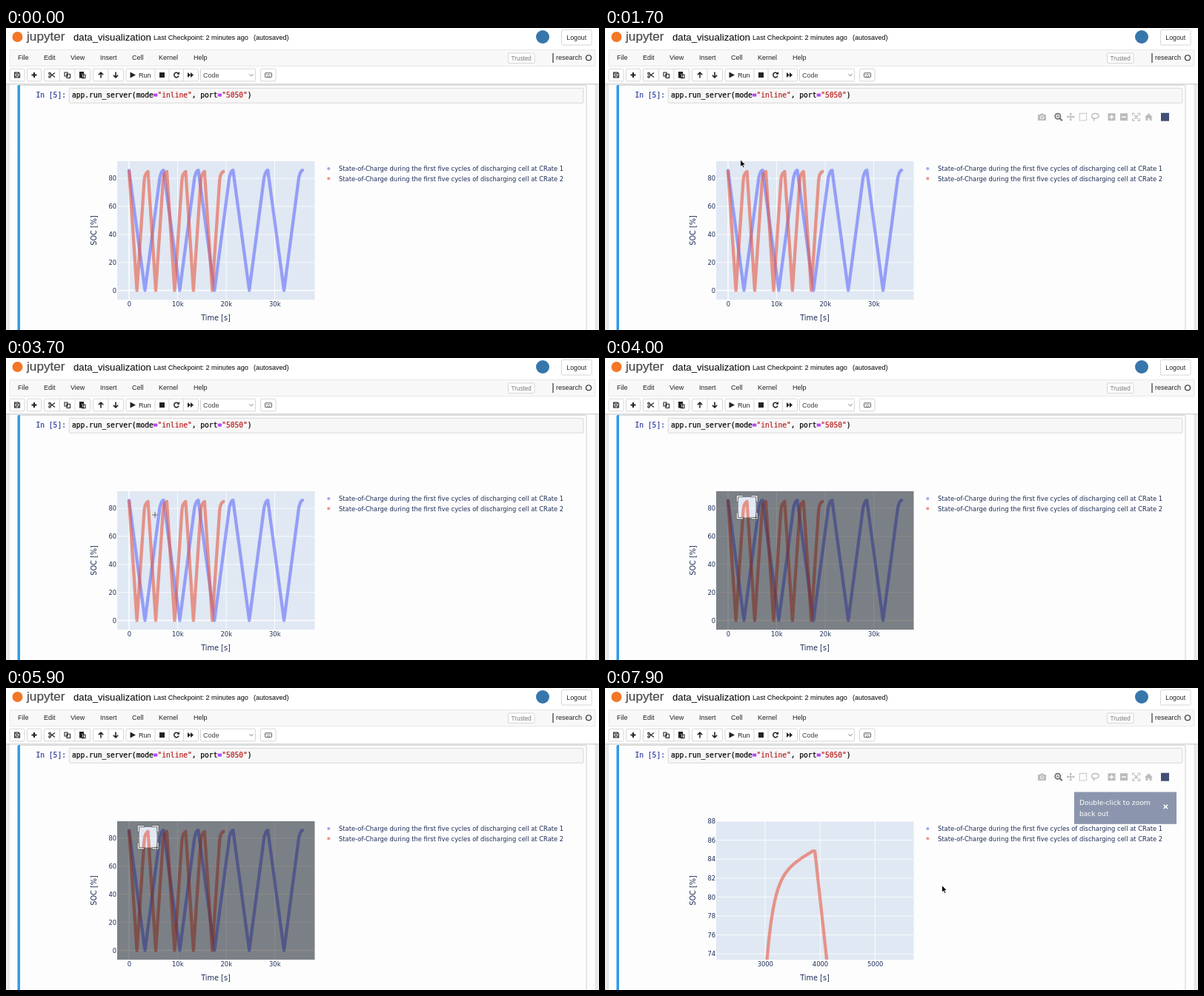
Write an HTML page that moves like this. It is 800 px wide and 408 px high and loops after 8000 ms.

```html
<!DOCTYPE html>
<html lang="en">
<head>
<meta charset="utf-8">
<title>Notebook zoom</title>
<style>
  html, body { margin: 0; width: 100%; height: 100%; overflow: hidden; background: #fff; }
  svg { display: block; width: 800px; height: 408px; }
  text { white-space: pre; }
  .ui { font: 9.02px "Liberation Sans", Arial, sans-serif; fill: #222; }
  .code { font: 9.61px "DejaVu Sans Mono", monospace; stroke-width: .22; }
  .plot { font: 8.37px "DejaVu Sans", Verdana, sans-serif; fill: #1c2c56; }
  .btn { fill: #fff; stroke: #ccc; stroke-width: .8; }
  .icon { fill: none; stroke: #222; stroke-width: 1.1; }
  .solid { fill: #222; }
  .bar { fill: none; stroke: #bcbcbc; stroke-width: 1.3; }
  .bar .fill { fill: #bcbcbc; stroke: none; }
</style>
</head>
<body>
<svg id="stage" viewBox="0 0 800 408">
  <defs>
    <clipPath id="box"><rect x="150" y="180" width="266.5" height="187"/></clipPath>
    <linearGradient id="shade" x2="0" y2="1">
      <stop stop-color="#ccc"/><stop offset="1" stop-color="#ccc" stop-opacity="0"/>
    </linearGradient>
    <linearGradient id="edge">
      <stop stop-color="#f0f0f0"/><stop offset="1" stop-color="#e2e2e2"/>
    </linearGradient>
  </defs>
</svg>
<script>
const NS = 'http://www.w3.org/2000/svg';
const stage = document.getElementById('stage');

function add(parent, tag, attrs = {}, content) {
  const el = document.createElementNS(NS, tag);
  for (const key in attrs) el.setAttribute(key, attrs[key]);
  if (content !== undefined) el.textContent = content;
  return parent.appendChild(el);
}
const group = (parent, attrs) => add(parent, 'g', attrs);
const rect = (p, x, y, width, height, attrs) => add(p, 'rect', { x, y, width, height, ...attrs });
const path = (p, d, attrs) => add(p, 'path', { d, ...attrs });
const dot = (p, cx, cy, r, attrs) => add(p, 'circle', { cx, cy, r, ...attrs });
const label = (p, x, y, str, cls, style = '', anchor = 'start') =>
  add(p, 'text', { x, y, class: cls, style, 'text-anchor': anchor }, str);

// ---- Notebook page ----
rect(stage, 0, 75, 5, 333, { fill: 'url(#edge)' });
rect(stage, 0, 75, 5.5, 333, { fill: 'url(#edge)', transform: 'translate(800) scale(-1 1)' });
rect(stage, 5, 77, 789.5, 331, { fill: '#fdfdfd' });
rect(stage, 0, 75, 800, 2.5, { fill: 'url(#shade)' });
path(stage, 'M19 77.3H781.5Q783 77.3 783 79V408', { fill: 'none', stroke: '#c4c4c4', 'stroke-width': .8 });
path(stage, 'M15.5 408V78.5Q15.5 77 17 77H19V408Z', { fill: '#2f9be8' });

dot(stage, 15.5, 12, 7, { fill: '#f37726' });
label(stage, 28, 17.2, 'jupyter', 'ui', 'font-size:17.2px;fill:#4e4e4e;stroke:#4e4e4e;stroke-width:.25');
label(stage, 91, 16.7, 'data_visualization', 'ui', 'font-size:13.2px;fill:#000');
label(stage, 199, 16.3, 'Last Checkpoint: 2 minutes ago', 'ui', 'font-size:9.15px;fill:#000');
label(stage, 334, 16.3, '(autosaved)', 'ui', 'fill:#000');
dot(stage, 724, 12, 9, { fill: '#3776ab' });
rect(stage, 749.5, 2.5, 40.5, 20.5, { class: 'btn', rx: 1.5 });
label(stage, 769.7, 15.8, 'Logout', 'ui', 'font-size:8.8px', 'middle');

rect(stage, 5, 29.5, 790, 22, { fill: '#f8f8f8', stroke: '#e4e4e4', 'stroke-width': .8, rx: 1 });
[['File', 16], ['Edit', 51], ['View', 87], ['Insert', 127], ['Cell', 170], ['Kernel', 206], ['Help', 253]]
  .forEach(([name, x]) => label(stage, x, 43.2, name, 'ui'));
rect(stage, 677.5, 34, 35.5, 13.5, { class: 'btn', rx: 1.5 });
label(stage, 695.2, 43.6, 'Trusted', 'ui', 'font-size:8.2px;fill:#777', 'middle');
path(stage, 'M738 34V47', { class: 'icon' });
label(stage, 742, 43.2, 'research', 'ui');
dot(stage, 786, 40.3, 3.5, { class: 'icon' });

// ---- Toolbar ----
[[5, 20], [28.5, 19], [51.5, 62], [117.5, 41], [162, 97.5], [343.5, 20.5]]
  .forEach(([x, w]) => rect(stage, x, 55.2, w, 16.6, { class: 'btn', rx: 1.5 }));
path(stage, 'M72.5 55.5V71.5M93 55.5V71.5M138 55.5V71.5M201 55.5V71.5M220 55.5V71.5M239.5 55.5V71.5', { class: 'btn' });
rect(stage, 262.5, 55.2, 74, 16.6, { class: 'btn', rx: 1 });
label(stage, 266, 67, 'Code', 'ui', 'fill:#444');
label(stage, 179, 66.7, 'Run', 'ui');
path(stage, 'M328.5 62.3L331 64.8L333.5 62.3', { class: 'icon', style: 'stroke:#666;stroke-width:.9' });
path(stage, 'M11.5 60H17L18.5 61.5V67H11.5ZM13.3 60V62.5H16.3V60M13.2 67V64.5H16.8V67', { class: 'icon' });
path(stage, 'M38 60V67M34.5 63.5H41.5', { class: 'icon', style: 'stroke-width:2' });
path(stage, 'M60 62L66 66.5M60 65L66 60.5', { class: 'icon' });
dot(stage, 59, 61.3, 1.3, { class: 'icon' });
dot(stage, 59, 65.8, 1.3, { class: 'icon' });
path(stage, 'M79 60H83V65H79ZM82 62.3H86.5V67.5H82Z', { class: 'icon' });
path(stage, 'M99.5 59.5H104.5V67H99.5ZM102.5 63H107V67.8H102.5Z', { class: 'icon' });
path(stage, 'M99 59H105V62H102V67H99Z', { class: 'solid' });
path(stage, 'M128 67.5V60.5M124.8 63.3L128 60.1L131.2 63.3M148 59.5V66.5M144.8 63.7L148 66.9L151.2 63.7', { class: 'icon', style: 'stroke-width:1.6' });
path(stage, 'M167.5 59.5L175 63.5L167.5 67.5Z', { class: 'solid' });
rect(stage, 207, 60, 7, 7, { class: 'solid' });
path(stage, 'M232.5 61.5A3.2 3.2 0 1 0 233 64.5', { class: 'icon', style: 'stroke-width:1.5' });
path(stage, 'M230.3 62.7H234V59Z', { class: 'solid' });
path(stage, 'M245 60L249 63.5V60L253 63.5L249 67V63.5L245 67Z', { class: 'solid' });
rect(stage, 349.5, 60.7, 9, 5.8, { class: 'icon', style: 'stroke:#555;stroke-width:.9', rx: .6 });
path(stage, 'M350.8 62.7H357.5M351.8 65H356.5', { class: 'icon', style: 'stroke:#555;stroke-dasharray:1 .6' });

// ---- Code cell ----
label(stage, 40.5, 94.3, 'In [5]:', 'code', 'fill:#303f9f;stroke:#303f9f');
rect(stage, 85.3, 81.3, 693.5, 20, { fill: '#f7f7f7', stroke: '#cfcfcf', 'stroke-width': .8, rx: 1 });
const code = label(stage, 89, 94.3, '', 'code');
[['app.run_server(mode', '#000'], ['=', '#a2f'], ['"inline"', '#ba2121'], [', port', '#000'],
 ['=', '#a2f'], ['"5050"', '#ba2121'], [')', '#000']].forEach(([str, fill]) =>
  add(code, 'tspan', { fill, stroke: fill, 'font-weight': str === '=' ? 'bold' : 'normal' }, str));

// ---- Charge curves: seconds and percent ----
function cycles(first, period, start, rise) {
  const pts = [[0, start]];
  for (let i = 0; i < 5; i++) {
    const t0 = first + i * period;
    pts.push([t0, 0], ...rise.map(([t, v]) => [t0 + t, v]));
  }
  return pts;
}
const sample = (n, fn) => Array.from({ length: n + 1 }, (_, i) => fn(i / n));
const slow = cycles(3282, 7160, 85.6,
  sample(8, k => [3050 + 770 * k, 85.8 - 5.3 * (1 - k) ** 2]));
const fast = cycles(1620, 3880, 85, [
  ...sample(24, k => {
    const u = 835 * k;
    return [1414 + u, 85 - 8.6 * Math.exp(-u / 130) - 3 * (1 - u / 870)];
  }),
  [2285, 84.85]
]);
const BLUE = '#636efa', RED = '#e85a43';

function chart(X, Y, xTicks, yTicks, xName) {
  const g = group(stage);
  const inner = group(g, { 'clip-path': 'url(#box)' });
  const grid = (d, v) => path(inner, d, { stroke: '#fff', 'stroke-width': v ? .8 : 1.4 });
  xTicks.forEach(v => {
    grid(`M${X(v)} 180V367`, v);
    label(g, X(v) + .3, 376.2, xName(v), 'plot', '', 'middle');
  });
  yTicks.forEach(v => {
    grid(`M150 ${Y(v)}H416.5`, v);
    label(g, 149.2, Y(v) + 3.2, v, 'plot', '', 'end');
  });
  [[slow, BLUE], [fast, RED]].forEach(([pts, stroke]) =>
    add(inner, 'polyline', {
      points: pts.map(([t, v]) => `${X(t).toFixed(2)},${Y(v).toFixed(2)}`).join(' '),
      fill: 'none', stroke, 'stroke-width': 4.3, opacity: .6,
      'stroke-linejoin': 'round', 'stroke-linecap': 'round'
    }));
  return g;
}

rect(stage, 150, 180, 266.5, 187, { fill: '#e0e8f3' });
const full = chart(t => 166 + t * .00655, v => 354.5 - v * 1.8925,
  [0, 10000, 20000, 30000], [0, 20, 40, 60, 80], v => v ? v / 1000 + 'k' : '0');
const zoomed = chart(t => 216 + (t - 3000) * .0742, v => 180 + (88 - v) * 12.8,
  [3000, 4000, 5000], [74, 76, 78, 80, 82, 84, 86, 88], v => v);
label(stage, 283, 394.7, 'Time [s]', 'plot', 'font-size:9.72px', 'middle');
add(stage, 'text', {
  transform: 'translate(122 273.5) rotate(-90)', class: 'plot',
  style: 'font-size:9.72px', 'text-anchor': 'middle'
}, 'SOC [%]');
[[190, BLUE, 1], [203.4, RED, 2]].forEach(([y, fill, n]) => {
  dot(stage, 435.3, y, 2.1, { fill, opacity: .6 });
  label(stage, 449, y + 3.4, 'State-of-Charge during the first five cycles of discharging cell at CRate ' + n, 'plot');
});

// ---- Mode bar ----
const bar = group(stage, { class: 'bar' });
path(bar, 'M584 117H587L588 115.5H591L592 117H595V125H584Z', { class: 'fill' });
dot(bar, 589.5, 120.8, 2.1, { style: 'stroke:#fff;stroke-width:1' });
const lens = group(bar, { style: 'stroke:#737373' });
dot(lens, 610.8, 119.3, 3.6, { 'stroke-width': 1.8 });
path(lens, 'M613.5 122L616.8 125.3', { 'stroke-width': 2.2 });
path(lens, 'M609 119.3H612.6M610.8 117.5V121.1', { 'stroke-width': .9 });
path(bar, 'M623.5 120H633M628.2 115.2V124.8');
path(bar, 'M622.5 120L625 118V122ZM634 120L631.5 118V122ZM628.2 114.3L626.2 116.7H630.2ZM628.2 125.7L626.2 123.3H630.2Z', { class: 'fill' });
rect(bar, 640.2, 115.5, 9.4, 9.4, { 'stroke-dasharray': '1.7 1' });
path(bar, 'M659 123C655 120 656 115.5 661.5 115.5S668 120.5 663 122C660 123 657.5 120.5 659 122.5Q661 124 659.5 125.6');
[683.5, 700].forEach((x, i) => {
  rect(bar, x - 5, 115.2, 10, 10, { class: 'fill' });
  path(bar, `M${x - 3} 120.2h6` + (i ? '' : `M${x} 117.2v6`), { style: 'stroke:#fff;stroke-width:1.5' });
});
path(bar, 'M711.8 118V115.3H714.5M718.7 115.3H721.5V118M721.5 122.3V125H718.7M714.5 125H711.8V122.3M714 117.5L719.3 122.8M719.3 117.5L714 122.8');
path(bar, 'M728 120.5L733.5 115.3L739 120.5H737.5V125H734.7V122H732.3V125H729.5V120.5Z', { class: 'fill' });
rect(bar, 750, 114.7, 11, 11, { style: 'fill:#3f4f75;stroke:none' });

// ---- Hover label ----
const tip = group(stage);
rect(tip, 265, 209, 62, 15, { fill: '#e5ecf6', opacity: .8 });
path(tip, 'M187 216.5L191.2 212.3V209H265V224H191.2V220.7Z', { fill: '#e2502f', stroke: '#444', 'stroke-width': .8 });
label(tip, 194, 219.7, '(3021, 72.82741)', 'ui', 'fill:#444');
label(tip, 266.8, 219.7, 'State-of-Cha...', 'ui', 'fill:#e2502f');

// ---- Zoom selection ----
const select = group(stage);
const dim = path(select, '', { 'fill-rule': 'evenodd', fill: '#000', 'fill-opacity': .45 });
const corners = path(select, '', { fill: '#fff', stroke: '#444', 'stroke-width': .7 });
const START = [179.8, 188];

function drawSelection([r, b]) {
  const [l, t] = START;
  dim.setAttribute('d', `M150 180H416.5V367H150ZM${l} ${t}V${b}H${r}V${t}Z`);
  const c = Math.max(0, Math.min(r - l, b - t, 14) / 2), w = 2.1, e = .35;
  const corner = (x, y, sx, sy) =>
    `M${x - sx * (w + e)} ${y + sy * (c - e)}h${sx * w}v${-sy * c}h${sx * c}v${-sy * w}h${-sx * (c + w)}v${sy * (c + w)}Z`;
  corners.setAttribute('d',
    corner(l, t, 1, 1) + corner(r, t, -1, 1) + corner(r, b, -1, -1) + corner(l, b, 1, -1));
}

// ---- Notice ----
const notice = group(stage);
rect(notice, 633, 140.5, 138, 43.3, { fill: '#8b96ae' });
const noticeStyle = 'font-size:9.12px;fill:#fff';
label(notice, 640, 158, 'Double-click to zoom', 'plot', noticeStyle);
label(notice, 640, 173, 'back out', 'plot', noticeStyle);
path(notice, 'M753.7 157.7L759 163M759 157.7L753.7 163', { stroke: '#fff', 'stroke-width': 1.6 });

// ---- Pointer ----
const arrow = path(stage, 'M0 0V9.6L2.2 7.6L3.8 11L5.4 10.3L3.9 7H6.8Z', { stroke: '#fff', 'stroke-width': .8 });
const cross = group(stage);
path(cross, 'M-4.3 0H4.3M0 -4.3V4.3', { stroke: '#fff', 'stroke-width': 1.8, opacity: .4 });
path(cross, 'M-4 0H4M0 -4V4', { stroke: '#333', 'stroke-width': .75 });

// ---- Motion ----
const LOOP = 8000, STEP = 100, RELEASE = 6300;
const POINTER = [[300, 110, 408], [800, 184, 160], [1400, 184, 160], [2100, 181, 202], [2700, 181, 202],
  [3100, ...START], [3500, ...START], [3700, 201, 212], [3800, 203.5, 215.4], [6700, 203.5, 215.4], [7600, 454.5, 266.5]];
const BAR = [[400, 0], [700, 1], [3300, 1], [3650, 0], [6330, 0], [6800, 1]];
const NOTICE = [[6360, 0], [6900, 1]];
const DIM = [[3700, 0], [3900, 1]];

function track(keys, t) {
  const next = keys.findIndex(k => k[0] > t);
  if (next === 0) return keys[0].slice(1);
  if (next < 0) return keys[keys.length - 1].slice(1);
  const a = keys[next - 1], b = keys[next], k = (t - a[0]) / (b[0] - a[0]);
  return a.slice(1).map((v, i) => v + (b[i + 1] - v) * k);
}
const show = (el, on) => { el.style.display = on ? '' : 'none'; };

function draw(t) {
  const pos = track(POINTER, t), [x, y] = pos;
  const inside = x > 150 && x < 416 && y > 180 && y < 367;
  const place = `translate(${x} ${y})`;
  arrow.setAttribute('transform', place);
  cross.setAttribute('transform', place);
  show(arrow, t > 300 && !inside);
  show(cross, inside);
  show(full, t < RELEASE);
  show(zoomed, t >= RELEASE);
  show(tip, t >= 2100 && t < 2900);
  show(select, t > 3700 && t < RELEASE);
  drawSelection(pos);
  select.style.opacity = track(DIM, t)[0];
  bar.style.opacity = track(BAR, t)[0];
  notice.style.opacity = track(NOTICE, t)[0];
}

const begin = performance.now();
function tick() {
  const t = (performance.now() - begin) % LOOP;
  draw(Math.floor(t / STEP) * STEP);
  requestAnimationFrame(tick);
}
tick();
</script>
</body>
</html>
```
